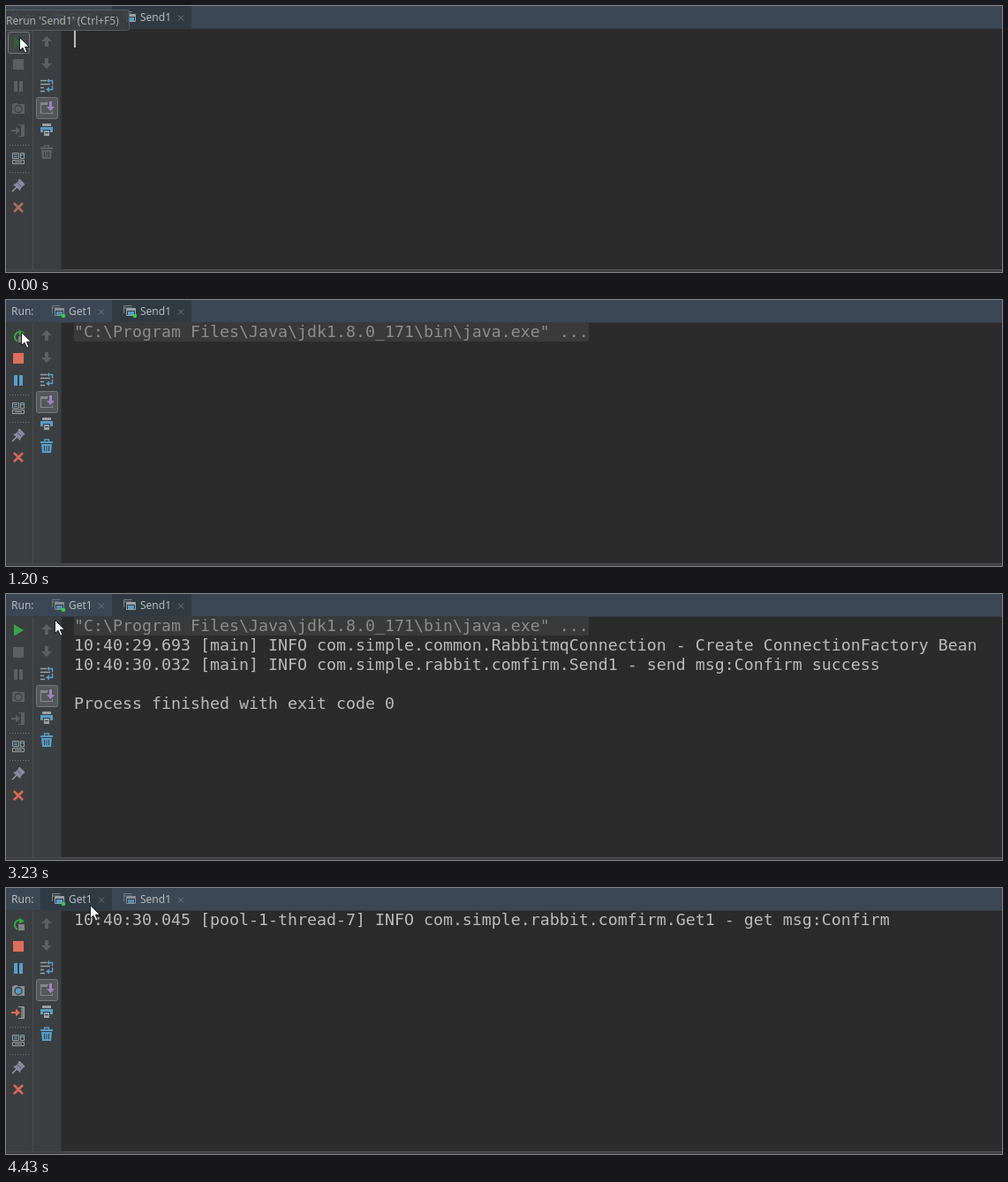
Recreate the animation shown at these times as an HTML page. Size 1128 by 301 pixels, loop 4.9 s.

```html
<!DOCTYPE html>
<html lang="en">
<head>
<meta charset="utf-8">
<title>Run console</title>
<style>
html, body { margin: 0; width: 100%; height: 100%; overflow: hidden; background: #2b2b2b; }
svg { display: block; width: 100vw; height: 100vh; }
text { white-space: pre; }
.ui { font: 12px "Noto Sans", "Open Sans", sans-serif; fill: #bbbbbb; }
.log { font: 18.27px "DejaVu Sans Mono", "Noto Sans Mono", monospace; fill: #bbbbbb; }
</style>
</head>
<body>
<svg id="stage" viewBox="0 0 1128 301"></svg>
<script>
const LOOP = 4900;
const GREY = '#5d6062', LIGHT = '#9da1a4', BLUE = '#559fca', RED = '#df6d5b', GREEN = '#37a846', PURPLE = '#a183c4';
const stage = document.getElementById('stage');

const rect = (x, y, w, h, fill, extra = '') =>
  `<rect x="${x}" y="${y}" width="${w}" height="${h}" fill="${fill}" ${extra}/>`;
const path = (d, fill) => `<path d="${d}" fill="${fill}"/>`;
const line = (d, color, w = 1) => `<path d="${d}" fill="none" stroke="${color}" stroke-width="${w}"/>`;
const at = (x, y, body) => `<g transform="translate(${x} ${y})">${body}</g>`;
const label = (x, y, str, cls = 'ui', extra = '') => `<text x="${x}" y="${y}" class="${cls}" ${extra}>${str}</text>`;
const log = (row, str, extra) => label(77, 42 + 22 * row, str, 'log', extra);
const caret = row => rect(77, 26 + 22 * row, 2, 21, '#bbbbbb');

// Toolbar icons, each drawn around its own centre
const icon = {
  play: c => path('M-5 -6.5L6 0L-5 6.5Z', c),
  rerun: () => line('M3.5 -4.2A5.2 5.2 0 1 0 -1 5.6', GREEN, 2) + path('M1 -7.5L7 -3.5L1 -.5Z', GREEN) + rect(0, 0, 7, 7, '#7f8385'),
  stop: c => rect(-6, -6, 12, 12, c),
  pause: c => rect(-5, -6, 4, 12, c) + rect(1, -6, 4, 12, c),
  camera: on => rect(-7, -5, 14, 11, on ? '#8a9094' : GREY) + rect(-5, -6, 4, 2, on ? '#8a9094' : GREY) +
    `<circle cy=".5" r="4" fill="${on ? BLUE : GREY}" stroke="#3c3f41" stroke-width="1.3"/>`,
  exit: on => line('M0 -6.5H6.5V6.5H0', on ? LIGHT : GREY) + rect(3, -6, 3, 12, on ? '#777b7d' : GREY) +
    rect(-8, -1, 6, 2, on ? RED : GREY) + path('M-3 -4.5L2 0L-3 4.5Z', on ? RED : GREY),
  layout: () => line('M-6.5 -5.5H.5V.5H-6.5ZM2.5 -5.5H6.5V.5H2.5ZM-6.5 2.5H6.5V6.5H-6.5Z', LIGHT) +
    rect(-5, -4, 4, 1, BLUE) + rect(-5, -2, 4, 1, BLUE) + rect(3, -4, 3, 1, BLUE) + rect(-4, 4, 8, 1, LIGHT),
  pin: () => line('M-7 7L-2 2', LIGHT, 1.3) + path('M-6 -1L2 6L3 3L6 0L7 0L7 -2L2 -7L0 -7L0 -5L-3 -2Z', '#8b86a3') +
    line('M-1 -3L3 1', '#55536a'),
  close: c => line('M-5 -5L5 5M5 -5L-5 5', c, 2.5),
  arrow: dir => `<g transform="scale(1 ${dir})">${path('M0 -6L6 0H2V6H-2V0H-6Z', GREY)}</g>`,
  wrap: () => line('M-7 -5.5H0M-7 -1.5H4M-7 2.5H-3M-7 6.5H-2', LIGHT, 1.3) +
    line('M2 -5.5H6.5V-1.5M6.5 0V4.5H1', BLUE, 1.5) + path('M3 1.5L-1 4.5L3 7.5Z', BLUE) + path('M3 -8L0 -5.5L3 -3Z', BLUE),
  scroll: () => line('M2 -5.5H-6.5V6.5H6.5V4', '#85888a', 1.2) + rect(-6, -5, 7, 2, '#85888a') +
    rect(3, -7, 3, 7, PURPLE) + path('M0 -1H9L4.5 4Z', PURPLE),
  print: () => rect(-5, -7, 10, 3, LIGHT) + path('M-7 -3H7V3H4V0H-4V3H-7Z', BLUE) + rect(-3, 1, 6, 6, LIGHT) + rect(-2, 3, 4, 1, '#3c3f41'),
  trash: c => rect(-7, -5, 14, 2, c) + line('M-2.5 -5V-7H2.5V-5', c, 1.3) +
    path('M-6 -2H6L5 8H-5Z', c) + line('M-2.5 0V6M0 0V6M2.5 0V6', '#3c3f41', 1)
};

// Pointer positions, each held until the next time
const moves = [
  [0, 15, 35], [30, 16, 35], [120, 17, 36],
  [3150, 22, 35], [3190, 38, 32], [3230, 55, 29], [3280, 74, 25], [3320, 86, 22], [3370, 94, 20], [3410, 97, 20],
  [4120, 96, 19], [4300, 95, 19]
];
const fades = [[0, .87], [30, .66], [120, .44], [210, .2], [310, 0]];
const held = (keys, t) => keys.filter(k => k[0] <= t).pop();
const within = (t, a, b) => t >= a && t < b;

function tab(x, w, name, selected, running) {
  const win = line('M.5 9V.5H9.5M.5 3H9', '#7e8487') + rect(3, 3, 11, 9, '#2f3b45') +
    line('M3.5 3.5H13.5V11.5H3.5Z', LIGHT) + rect(4, 4, 9, 2, LIGHT) + rect(5, 7, 7, 4, BLUE);
  const dot = running ? '<circle cx="13" cy="12" r="2.3" fill="#2fd13a"/>' : '';
  const cross = line(`M${x + w - 15} 10.5l6 6m0 -6l-6 6`, '#73797e');
  return (selected ? rect(x, 0, w, 25, '#2f3a43') : '') +
    at(x + 13, 6, `<g opacity="${selected ? 1 : .8}">${win}</g>${dot}`) +
    label(x + 32, 17, name) + cross;
}

function runButton(t) {
  const pressed = t < 460;
  const frame = t < 820 || within(t, 3150, 3190);
  const box = rect(2.5, 29.5, 24, 24, pressed ? '#414547' : '#55595b', 'rx="2" stroke="#75797b"');
  return (frame ? box : '') + at(14, 41, icon.play(pressed ? '#2c6138' : GREEN));
}

function leftBar(t, onGet) {
  const live = within(t, 1200, 2770);
  const running = live || onGet;
  const lift = live ? -50 : 0;
  const dots = y => `<path d="M4 ${y + .5}H27" stroke="#777b7d" stroke-dasharray="1 2"/>`;
  let out = running ? at(14, 41, icon.rerun()) : runButton(t);
  out += at(14, 66, icon.stop(running ? RED : GREY));
  out += at(14, 91, icon.pause(onGet || within(t, 1200, 2950) ? BLUE : GREY));
  if (!live) out += at(14, 116, icon.camera(onGet)) + at(14, 141, icon.exit(onGet));
  return out + at(0, lift, dots(157) + at(14, 172, icon.layout()) + dots(188) +
    at(14, 203, icon.pin()) + at(14, 228, icon.close(t < 1200 ? '#ac705d' : '#d96a57')));
}

function rightBar(t) {
  return at(46, 40, icon.arrow(1)) + at(46, 65, icon.arrow(-1)) + at(46, 90, icon.wrap()) +
    rect(34.5, 103.5, 24, 24, '#54585a', 'rx="2" stroke="#75797b"') + at(46, 115, icon.scroll()) +
    at(46, 140, icon.print()) + at(46, 165, icon.trash(t < 1200 ? GREY : BLUE));
}

function output(t, onGet) {
  if (onGet) {
    return log(0, '10:40:30.045 [pool-1-thread-7] INFO com.simple.rabbit.comfirm.Get1 - get msg:Confirm') +
      (t < 4430 ? caret(1) : '');
  }
  let out = t < 210 || within(t, 690, 1200) ? caret(0) : '';
  if (t >= 1200) out += rect(77, 26, 583, 21, '#3a3a3a') +
    log(0, '"C:\\Program Files\\Java\\jdk1.8.0_171\\bin\\java.exe" ...', 'style="fill:#8c8c8c"');
  if (t >= 2260) out += log(1, '10:40:29.693 [main] INFO com.simple.common.RabbitmqConnection - Create ConnectionFactory Bean');
  if (t >= 2590) out += log(2, '10:40:30.032 [main] INFO com.simple.rabbit.comfirm.Send1 - send msg:Confirm success');
  if (t >= 2950) out += log(4, 'Process finished with exit code 0');
  if (t >= 3840) out += caret(5);
  return out;
}

function tooltip(t) {
  const alpha = held(fades, t)[1];
  return alpha ? `<g opacity="${alpha}">` + rect(-3.5, 4.5, 143, 23, '#3c3f41', 'rx="2" stroke="#606365"') +
    label(0, 21, "Rerun 'Send1' (Ctrl+F5)") + '</g>' : '';
}

function pointer(t) {
  const [, x, y] = held(moves, t);
  return at(x, y, '<path d="M.5 .5V15.5L4 12.2L6.6 18.2L9 17.2L6.4 11.3H11.3Z" fill="#fff" stroke="#111" stroke-width=".9"/>');
}

const base = rect(0, 0, 1128, 301, '#2b2b2b') + rect(0, 0, 1128, 25, '#3b4754') + rect(0, 25, 1128, 1, '#353c42') +
  rect(0, 26, 62, 272, '#3c3f41') + rect(30, 26, 1, 272, '#4b4e50') + rect(62, 26, 1, 272, '#333537') +
  rect(0, 298, 1128, 3, '#3c3f41') + rect(0, 298, 66, 1, '#4b4848') + rect(66, 298, 1062, 1, '#575153') +
  label(6, 17, 'Run:');

function scene(t) {
  const onGet = t >= 3950;
  return base + tab(39, 81, 'Get1', onGet, true) + tab(120, 90, 'Send1', !onGet, within(t, 1200, 2770)) +
    leftBar(t, onGet) + rightBar(t) + output(t, onGet) + tooltip(t) + pointer(t);
}

let shown = '';
function draw(now) {
  const next = scene(Math.max(0, now - start) % LOOP);
  if (next !== shown) stage.innerHTML = shown = next;
  requestAnimationFrame(draw);
}
const start = performance.now();
draw(start);
</script>
</body>
</html>
```
